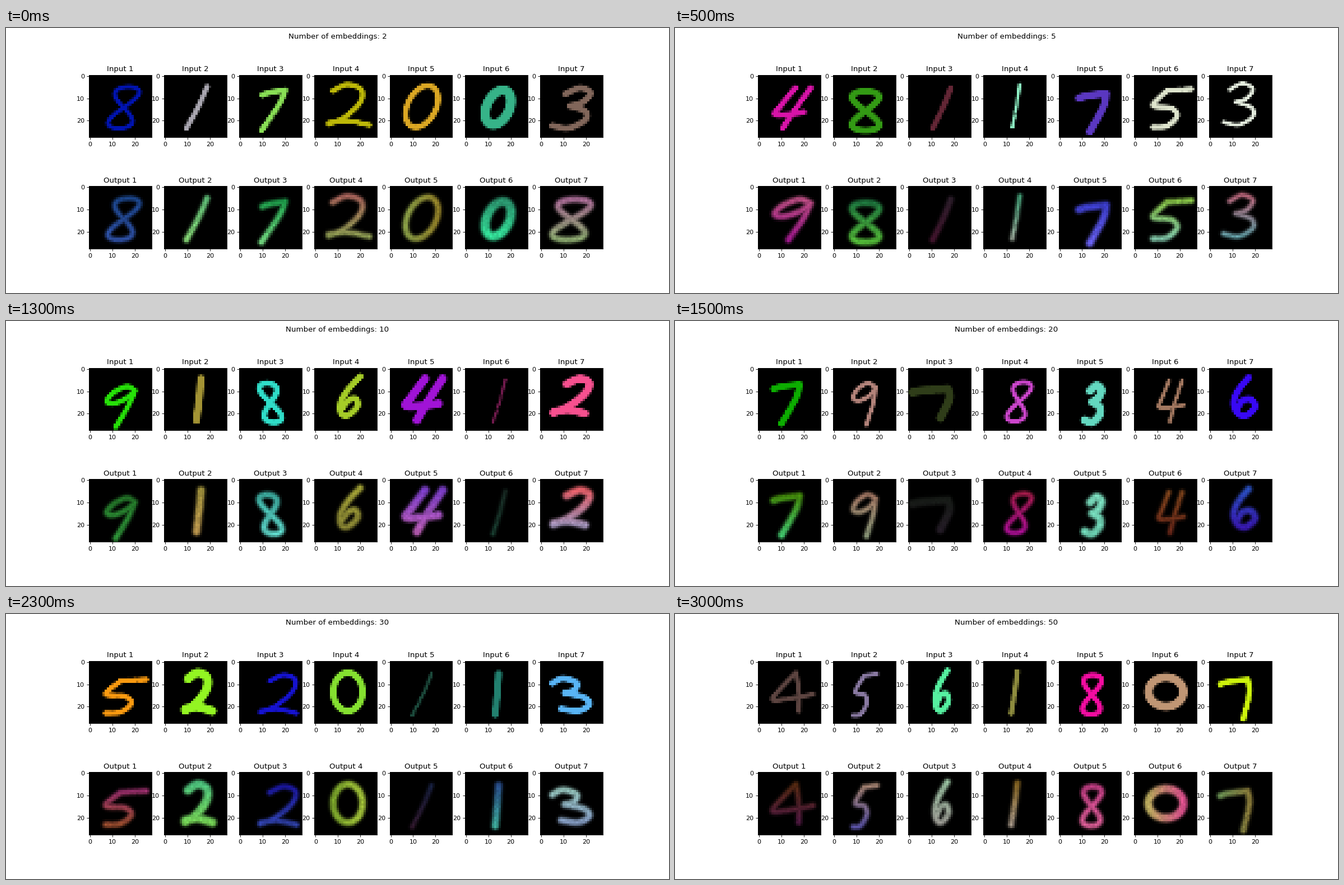
Write a matplotlib script that moves like this. It is 1183 px wide and 473 px high and loops after 3.5 s.

```python
import numpy as np
import matplotlib.pyplot as plt
from matplotlib.animation import FuncAnimation
from matplotlib.colors import to_rgb

W, H, DPI = 1183, 473, 80
COLS, N = 7, 28
SIZES = [2, 5, 10, 20, 30, 40, 50]

gy, gx = np.mgrid[0:N, 0:N].astype(float)
rng = np.random.default_rng(4)
pairs = []


def curve(*flat, steps=10):
    """Catmull-Rom curve through x, y, x, y, ..."""
    p = np.array(flat, float).reshape(-1, 2)
    p = np.vstack([p[0], p, p[-1]])
    t = np.linspace(0, 1, steps)[:, None]
    a, b, c, d = p[:-3, None], p[1:-2, None], p[2:-1, None], p[3:, None]
    q = 2 * b + (c - a) * t + (2 * a - 5 * b + 4 * c - d) * t**2
    return ((q + (3 * b - a - 3 * c + d) * t**3) / 2).reshape(-1, 2)


def loop(turns):
    """Closed curve: an oval for one turn, a figure eight for two."""
    t = np.linspace(0, 2 * np.pi, 90)
    return np.column_stack([.5 + .5 * np.sin(turns * t), .5 - .5 * np.cos(t)])


# Upright strokes in the unit square
SHAPES = {
    "0": [loop(1)],
    "1": [curve(1, 0, .6, .45, 0, 1)],
    "2": [curve(.1, .15, .45, 0, .8, .12, .78, .42, .4, .78, 0, .95), curve(0, .92, .45, .87, 1, .97)],
    "3": [curve(.2, .15, .6, 0, .95, .13, .75, .36, .4, .45),
          curve(.4, .45, .9, .58, .95, .8, .5, 1, 0, .94)],
    "4": [curve(.4, 0, .1, .45, 0, .65, .45, .66, 1, .6), curve(.95, 0, .65, .55, .45, 1)],
    "4 closed": [curve(.58, 0, .3, .3, 0, .7, .5, .66, 1, .56), curve(.58, 0, .65, .5, .65, 1)],
    "5": [curve(1, .04, .4, .08), curve(.4, .08, .05, .45, .5, .52, .65, .72, .4, .97, .05, 1)],
    "6": [curve(.7, 0, .2, .35, 0, .68, .2, .95, .6, 1, 1, .78, .8, .58, .4, .62, .15, .85)],
    "7": [curve(0, .12, .3, .06, 1, 0), curve(1, 0, .9, .35, .4, 1)],
    "8": [loop(2)],
    "9": [curve(1, .1, .6, 0, .15, .15, 0, .36, .3, .42, .75, .3, 1, .1), curve(1, .1, .95, .5, .75, 1)],
}


def distance(kind, box, slant):
    """Distance of every cell to a slanted digit fitted into the box."""
    p = np.vstack(SHAPES[kind])
    p[:, 0] += slant * (1 - p[:, 1])
    p = (p - p.min(0)) / np.ptp(p, axis=0)
    p = np.array(box[:2]) + p * np.subtract(box[2:], box[:2])
    return np.hypot(gx[..., None] - p[:, 0], gy[..., None] - p[:, 1]).min(-1)


def pair(kind, ink, box, width, glow, slant=0, redrawn=None, across=False):
    """One flat digit and its blurry copy, tinted from one colour to another."""
    d = distance(kind, box, slant)
    flat = np.clip((width + .4 - d) * 1.6, 0, 1)[..., None] * np.array(to_rgb(ink))

    d = distance(redrawn or kind, box, slant)
    a = 1 / (1 + np.exp((d - .8 * width - .4) / .35))
    a = np.where(a < .03, 0, a) * rng.uniform(.9, 1.06, (N, N))
    lo, hi, pos = (box[0], box[2], gx) if across else (box[1], box[3], gy)
    mix = np.clip((pos - lo) / (hi - lo), 0, 1)[..., None]
    first, last = (np.array(to_rgb(c)) for c in glow.split())
    copy = a[..., None] * (first + (last - first) * mix)
    pairs.append((flat, np.clip(copy, 0, 1)))


# 2 embeddings
pair("8", "#0013b0", (8, 5, 22, 23.5), .9, "#1d4a94 #3358b5", .4)
pair("1", "#a9a6b0", (9.5, 5, 18.7, 23.5), 1.1, "#66cc80 #8fe57e")
pair("7", "#88de55", (9.5, 6.5, 20, 24.5), 1.2, "#20a850 #7be88a", .5)
pair("2", "#bdb808", (6, 4, 24, 22), 1.1, "#b0685f #98a858")
pair("0", "#dba723", (6.5, 4.5, 21, 23), 1.2, "#8fa64a #98862a", .4, across=True)
pair("0", "#36b388", (8.5, 6.5, 20, 21.8), 2.1, "#2c9a72 #34e29a", .4)
pair("3", "#81665a", (5, 5.5, 22, 23.5), 1.3, "#b0709c #8fae72", .25, "8")

# 5 embeddings
pair("4", "#d813a8", (7, 5.5, 23, 23.5), 1.2, "#c04f86 #a81a94", .5, "9")
pair("8", "#339a14", (8, 7, 20, 24.5), 1.4, "#1f7a40 #56c03a")
pair("1", "#632635", (10.5, 5.5, 18.5, 23.5), 1.2, "#30202e #45152f")
pair("1", "#8ef0c4", (12.5, 4, 15.8, 23), .7, "#4db98a #a9b8a8")
pair("7", "#5a37c0", (8.5, 8, 20.5, 25), 1.6, "#3d3fd0 #6a62f4")
pair("5", "#dde3cc", (8, 6, 25, 23), 1.1, "#8fcf4a #86cfb0")
pair("3", "#e3ebdd", (6, 3.5, 19.5, 22), .8, "#c46a80 #6fb0b8")

# 10 embeddings
pair("9", "#26e008", (7.5, 8, 20, 26), 1.1, "#257a2a #32a23e", .6)
pair("1", "#a39334", (14, 4.5, 16, 23), 1.6, "#a8983f #c09a50")
pair("8", "#2fddc8", (8.5, 6.5, 18.5, 24), 1.2, "#3fb5a8 #62e0d2", -.4)
pair("6", "#a5cc27", (11, 3.5, 20, 21), 1.3, "#a8a838 #8a8634", .6)
pair("4", "#a013d6", (6.5, 4.5, 23, 23), 1.8, "#8040d0 #c060bc", .3)
pair("1", "#701a4c", (12, 5, 17.5, 24), .6, "#1c3028 #1e4a3a")
pair("2", "#f7508f", (5.5, 4.5, 21.5, 20), 1.7, "#e8606a #a898c0", .4)

# 20 embeddings
pair("7", "#0cad00", (6.5, 7, 18, 24.5), 1.4, "#46920c #44cc70", .1)
pair("9", "#b3837a", (8.5, 6.5, 18.5, 25), .9, "#a87a66 #a0b08c", .2)
pair("7", "#2f3d19", (1.5, 9, 18, 22), 1.8, "#181c18 #241c26", -.4)
pair("8", "#cc45cc", (10, 6, 21, 23.5), .9, "#a81c4c #b810a0", .5)
pair("3", "#63d8c0", (11, 7.5, 18.5, 24), 1.7, "#7ce0c0 #70d8b8", .2)
pair("4", "#a37860", (10.5, 5.5, 21.5, 23.5), .8, "#8a4a1e #782c1c")
pair("6", "#3808f5", (10.5, 4, 20, 21), 1.4, "#2a50c0 #3a1ab8")

# 30 embeddings
pair("5", "#fa9a10", (7, 8, 25, 23), 1.1, "#a03070 #a05030")
pair("2", "#93f522", (9, 5, 21, 22), 1.9, "#50c880 #78d858")
pair("2", "#1512d0", (9, 6, 25, 23), 1, "#1c18a8 #3448b8", .2)
pair("0", "#85e030", (8, 5, 21, 22), 1.4, "#7eaa2c #a4c43a", across=True)
pair("1", "#1c4a3c", (9.5, 5.5, 18, 24), .7, "#1a2448 #381c34")
pair("1", "#22806f", (13, 5.5, 14.5, 23.5), 1.5, "#2a5090 #40b0a0")
pair("3", "#58b4f5", (5, 7.5, 21.5, 22), 1.3, "#98c8c0 #88a0c8", -.6)

# 40 embeddings
pair("3", "#8ea54e", (6, 6.5, 19, 23.5), 1.6, "#d0cc80 #c4b888")
pair("8", "#7a38d8", (9, 4.5, 17.5, 23), .8, "#5c2cb0 #5a80d8", .9)
pair("9", "#2d6a14", (8.5, 7, 20, 24.5), 1.1, "#1c4416 #12502a", .8)
pair("9", "#fa7a38", (10, 8, 18, 24), 1.8, "#d08a24 #e8c050", .5)
pair("6", "#d8b8b8", (10.8, 2.5, 21, 19.5), 1, "#90c0b0 #b0b060", -.45)
pair("1", "#e0b81c", (12.5, 4.5, 15.5, 23), 1.1, "#b07860 #b0d830")
pair("0", "#262e32", (9.5, 4.5, 17.5, 22.5), .7, "#22182e #301a50", .1)

# 50 embeddings
pair("4 closed", "#5c4440", (6, 5, 24, 22), 1, "#5a2c12 #581c48")
pair("5", "#8878a0", (8.5, 5.5, 19, 24), .9, "#b08c78 #6058b0", .2)
pair("6", "#55f0a0", (11.5, 4, 17.5, 22), 1.2, "#98c0a0 #a0a098", .3)
pair("1", "#8e8c3e", (12, 4.5, 14.7, 23), 1.1, "#906c24 #b0a090")
pair("8", "#f20ca0", (10, 6, 18.5, 23.5), 1.1, "#c84088 #e0609a", .1)
pair("0", "#c09674", (6, 7, 21.5, 20), 1.8, "#c0b060 #e05090", across=True)
pair("7", "#cdf30c", (4.5, 8, 17.5, 25.5), 1.2, "#709858 #90803c", -.45, across=True)

fig, axes = plt.subplots(2, COLS, figsize=(W / DPI, H / DPI), dpi=DPI)
heading = fig.suptitle("")
views = []
for ax_row, word in zip(axes, ("Input", "Output")):
    for i, ax in enumerate(ax_row):
        views.append(ax.imshow(np.zeros((N, N, 3))))
        ax.set_title(f"{word} {i + 1}")
        ax.set_xticks([0, 10, 20])
        ax.set_yticks([0, 10, 20])


def draw(k):
    heading.set_text(f"Number of embeddings: {SIZES[k]}")
    for i, (flat, copy) in enumerate(pairs[k * COLS:(k + 1) * COLS]):
        views[i].set_data(flat)
        views[i + COLS].set_data(copy)
    return [heading, *views]


anim = FuncAnimation(fig, draw, frames=len(SIZES), init_func=lambda: draw(0),
                     interval=500, repeat=True, repeat_delay=0)
plt.show()
```
